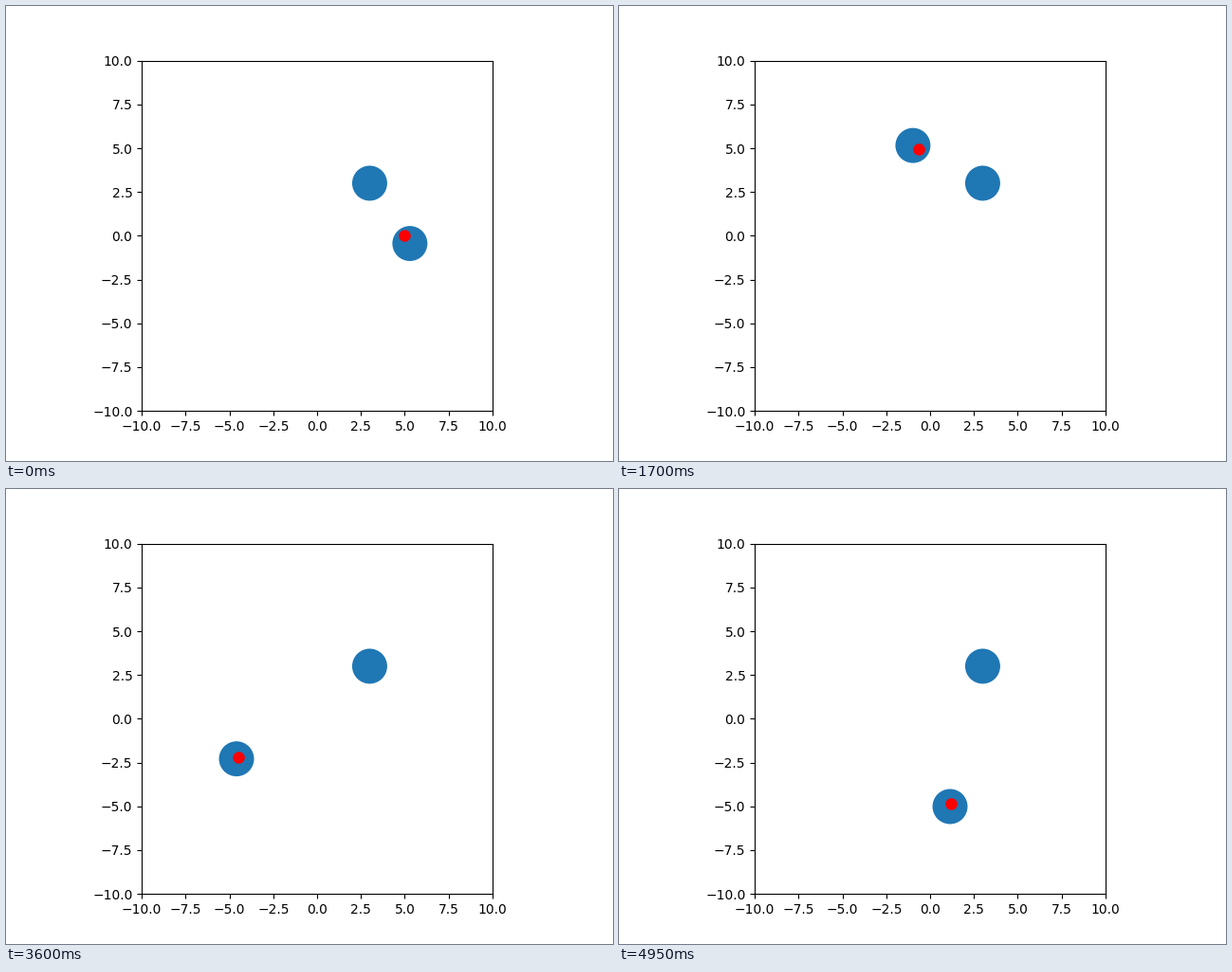
A matplotlib script for the animation above (5 s loop, 640 px wide and 480 px high).

```python
import numpy as np
import matplotlib.pyplot as plt
from matplotlib.animation import FuncAnimation
from matplotlib.patches import Circle

FRAMES = 100
STEP = 0.05      # radians the red dot advances per frame
ORBIT = 5.0
OBSTACLE = np.array([3.0, 3.0])
RADIUS = 1.0


def lead(i):
    angle = STEP * i
    return ORBIT * np.array([np.cos(angle), np.sin(angle)])


def repulsion(pos):
    away = pos - OBSTACLE
    return away / (np.linalg.norm(away) - RADIUS) ** 2


def follow():
    """Path of the disc that tracks the dot while the obstacle pushes it off."""
    pos, path = lead(0), []
    for i in range(FRAMES):
        pos = lead(i) + repulsion(pos)
        path.append(pos)
    return path


path = follow()

fig, ax = plt.subplots(figsize=(6.4, 4.8), dpi=100)
ax.set_xlim(-10, 10)
ax.set_ylim(-10, 10)
ax.set_aspect("equal")

ax.add_patch(Circle(OBSTACLE, RADIUS, color="C0", lw=0))
disc = ax.add_patch(Circle(path[0], RADIUS, color="C0", lw=0))
dot, = ax.plot([ORBIT], [0], "ro", markersize=8)


def update(i):
    disc.center = path[i]
    x, y = lead(i)
    dot.set_data([x], [y])
    return disc, dot


anim = FuncAnimation(fig, update, frames=FRAMES, interval=50,
                     repeat=True, repeat_delay=0)
plt.show()
```
